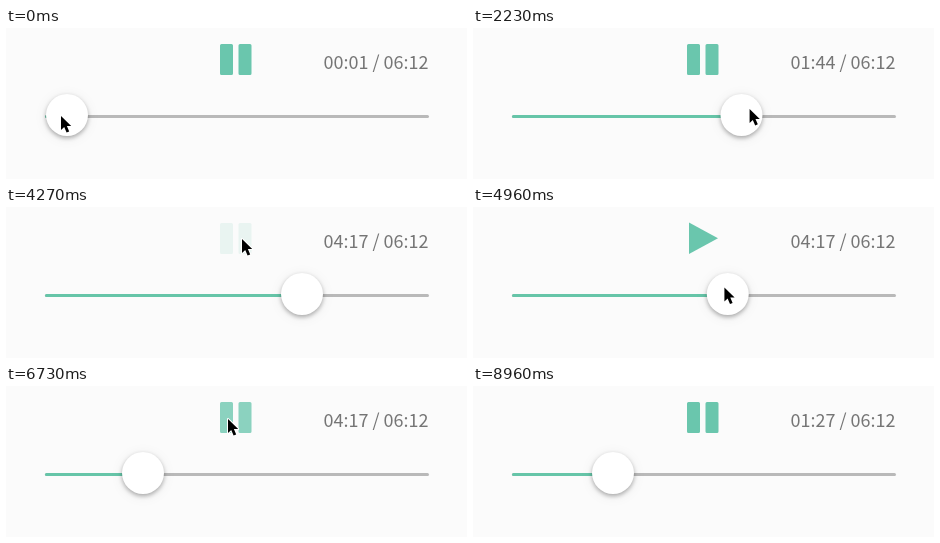
These frames come from a looping animation (461x151 px, 9.16 s). An HTML page:

```html
<!DOCTYPE html>
<html lang="en">
<head>
<meta charset="utf-8">
<title>Audio player</title>
<style>
html, body { margin: 0; width: 100%; height: 100%; overflow: hidden; background: #fbfbfb; }
svg { position: absolute; left: 0; top: 0; }
text { font: 300 18px "Noto Sans CJK JP Light", "Noto Sans CJK JP", "Noto Sans CJK SC", "Open Sans", sans-serif; fill: #757575; }
#knob {
  position: absolute; left: -21px; top: 66px; width: 42px; height: 42px;
  border-radius: 50%; background: #fff;
  box-shadow: 0 2px 4px rgba(0,0,0,.3), 0 2px 14px rgba(0,0,0,.07);
}
</style>
</head>
<body>
<svg width="461" height="151">
  <g fill="#6ac6ad">
    <path id="pause" d="M215.5 16h10q1.5 0 1.5 1.5v28q0 1.5-1.5 1.5h-10q-1.5 0-1.5-1.5v-28q0-1.5 1.5-1.5zm18.500 0h10q1.500 0 1.500 1.500v28q0 1.500-1.500 1.500h-10q-1.500 0-1.500-1.500v-28q0-1.500 1.500-1.500z"/>
    <path id="play" d="M216 15.500L245 31.300L216 47z"/>
  </g>
  <text id="clock" x="317.500" y="41"></text>
  <rect x="39" y="87" width="384" height="3" rx="1.500" fill="#b9b9b9"/>
  <rect id="fill" x="39" y="87" height="3" rx="1.500" fill="#66c5a8"/>
</svg>
<div id="knob"></div>
<svg width="461" height="151">
  <path id="cursor" d="M0 0V14L3.200 11L5.600 16.500L8.200 15.400L5.900 10H10.200z"
    stroke="#fff" stroke-width="2" stroke-linejoin="round" paint-order="stroke"/>
</svg>
<script>
const LOOP = 9160;
const $ = id => document.getElementById(id);
const smooth = p => p * p * (3 - 2 * p);
const easeOut = p => 1 - (1 - p) ** 2.2;
const linear = p => p;

// Each move: first step time, last step time, steps, end point, easing
const cursorMoves = [
  [90, 450, 5, [136, 85], smooth],
  [1610, 2490, 11, [308, 80], smooth],
  [3560, 3910, 5, [236, 32], smooth],
  [4530, 4690, 3, [296, 80], smooth],
  [4870, 5310, 6, [124, 82], smooth],
  [5670, 6030, 5, [222, 33], easeOut],
  [7990, 8250, 4, [392, 166], linear]
];
const knobMoves = [
  [90, 450, 5, [152], smooth],
  [1610, 2490, 11, [294.5], smooth],
  [3110, 3110, 1, [296], linear],
  [4870, 5310, 6, [137], smooth],
  [7450, 7450, 1, [138], linear],
  [8960, 8960, 1, [140], linear]
];
// Clock ticks: time, seconds shown
const ticks = [[0, 1], [1170, 103], [2140, 104], [3110, 256], [4090, 257], [7000, 85], [7990, 86], [8960, 87]];
// Icon fades: positive is pause opacity, negative is play opacity
const fades = [
  [4270, 4530, [1, .12, -.28, -.73, -1]],
  [6470, 6820, [-1, -.55, -.1, .3, .77, 1]]
];

function stepAt(t, from, to, n) {
  if (t < from) return 0;
  if (t >= to) return n;
  return Math.min(n, 1 + Math.floor((t - from) / (to - from) * (n - 1) + .08));
}

function follow(t, start, moves) {
  let pos = start;
  for (const [from, to, n, end, ease] of moves) {
    const p = ease(stepAt(t, from, to, n) / n);
    pos = pos.map((v, i) => v + (end[i] - v) * p);
    if (t < to) break;
  }
  return pos;
}

function icon(t) {
  const [from, to, levels] = fades[t < fades[1][0] ? 0 : 1];
  return levels[stepAt(t, from, to, levels.length - 1)];
}

const two = n => String(n).padStart(2, "0");
const mmss = s => two(Math.floor(s / 60)) + ":" + two(s % 60);

function draw(t) {
  const [x] = follow(t, [61], knobMoves);
  $("knob").style.transform = `translateX(${x}px)`;
  $("fill").setAttribute("width", x - 39);
  $("cursor").setAttribute("transform", `translate(${follow(t, [55, 88], cursorMoves)})`);
  const level = icon(t);
  $("pause").setAttribute("opacity", Math.max(0, level));
  $("play").setAttribute("opacity", Math.max(0, -level));
  const seconds = ticks.filter(k => k[0] <= t).pop()[1];
  $("clock").textContent = mmss(seconds) + " / " + mmss(372);
}

const begin = performance.now();
function loop() {
  draw((performance.now() - begin) % LOOP);
  requestAnimationFrame(loop);
}
loop();
</script>
</body>
</html>
```
